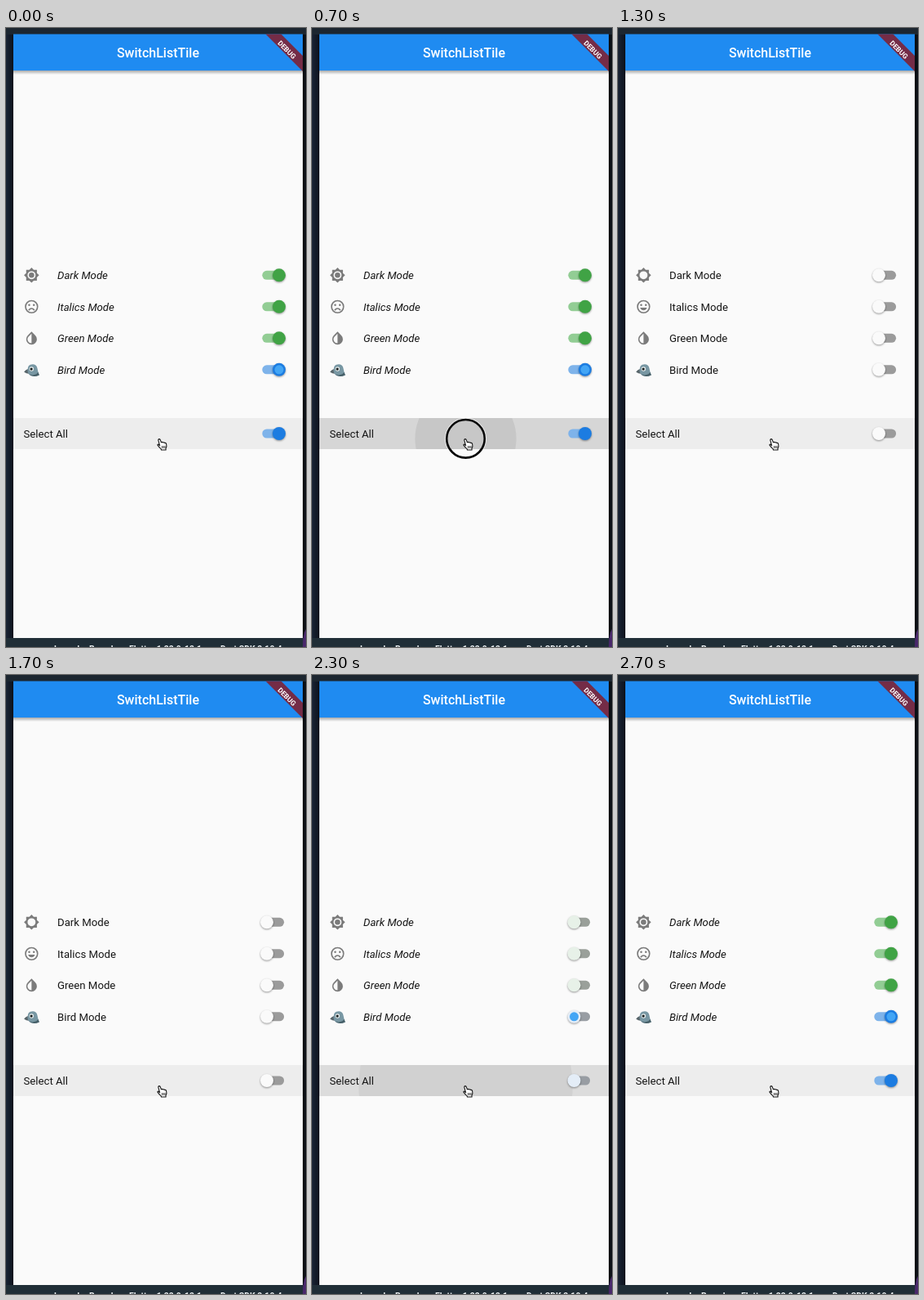
An HTML page for the animation above (2.8 s loop, 368 by 757 pixels).

```html
<!DOCTYPE html>
<html lang="en">
<head>
<meta charset="utf-8">
<title>SwitchListTile</title>
<style>
  html, body { margin: 0; width: 100%; height: 100%; overflow: hidden; background: #151d2a; }
  svg { display: block; width: 368px; height: 757px; font: 13.2px Roboto, sans-serif; fill: #161616; }
  .title { font-size: 16px; font-weight: 500; fill: #fff; text-anchor: middle; }
  .debug { font-size: 8.6px; font-weight: 700; fill: #fff; text-anchor: middle; }
  .status { font-size: 10.5px; font-weight: 700; fill: #e9eef0; }
  .icon { fill: #7b7b7b; }
  .line { fill: none; stroke: #7b7b7b; stroke-width: 2; }
  .thumb { filter: drop-shadow(0 1px 1px #0006); }
</style>
</head>
<body>
<svg viewBox="0 0 368 757">
  <defs>
    <linearGradient id="drop" x2="0" y2="1">
      <stop stop-color="#000" stop-opacity=".32"/>
      <stop offset="1" stop-color="#000" stop-opacity="0"/>
    </linearGradient>
    <linearGradient id="side">
      <stop stop-color="#1a2435"/>
      <stop offset="1" stop-color="#0c121c"/>
    </linearGradient>
    <clipPath id="tile"><path d="M9 477h355v38H9z"/></clipPath>
    <clipPath id="app"><path d="M9 7.5h355V746H9z"/></clipPath>
  </defs>

  <path fill="#1c2630" d="M0 0h368v8H0z"/>
  <path fill="url(#side)" d="M0 8h9v738H0z"/>
  <path fill="#0b0f15" d="M364 8h4v738h-4z"/>
  <path fill="#fafafa" d="M9 8h355v738H9z"/>
  <path fill="url(#drop)" d="M9 52h355v5H9z"/>
  <path fill="#1f8bf1" d="M9 7.5h355V52H9z"/>
  <text class="title" x="186.5" y="36">SwitchListTile</text>
  <path fill="#742c47" d="M318 7l46 46V34L337 7z" clip-path="url(#app)"/>
  <text class="debug" transform="translate(344.5 26.5) rotate(45)" y="3">DEBUG</text>

  <path fill="#202e37" d="M0 746h368v11H0z"/>
  <path fill="#49286b" d="M368 735q-4 6-4 22h4z"/>
  <g class="status">
    <text x="59" y="763">Launch</text><text x="102" y="763">Based on</text>
    <text x="151" y="763">Flutter 1.22.0-12.1</text><text x="263" y="763">Dart SDK 2.10.4</text>
  </g>

  <g clip-path="url(#tile)">
    <path fill="#ededed" d="M9 477h355v38H9z"/>
    <path id="highlight" d="M9 477h355v38H9z" fill="#000"/>
    <circle id="splash" cx="188.5" cy="502" fill="#000"/>
  </g>
  <g id="rows"></g>

  <g id="ring" fill="none">
    <circle cx="188.5" cy="502.3" r="24.6" stroke="#fff" stroke-width="2" opacity=".6"/>
    <circle cx="188.5" cy="502.3" r="23.3" stroke="#080808" stroke-width="2.6"/>
  </g>
  <path fill="#fff" stroke="#111" stroke-width="1.1" stroke-linejoin="round"
    d="M188.6 510.6l-1.7-6.2q-.2-1.7 1.1-1.8 1 0 1.4 1.3l.9 2.8q1.6-.9 2.3.3 1.5-.6 2.1.5 1.5-.4 1.9 1l.3 2.8q0 1.6-.9 2.6l.1 2.1h-5.6l-.4-1.4q-2.4-1.6-4-4.3-.4-1.2.8-1.2z"/>
  <path stroke="#111" stroke-width=".8" d="M191.6 511v3M193.3 511v3M195 511v3"/>
</svg>

<script>
const LOOP = 2800, STEP = 100;
const taps = [{ down: 355, up: 738 }, { down: 1750, up: 2248 }];
const BLUE = { thumb: [28, 124, 225], track: [126, 179, 234] };
const GREEN = { thumb: [64, 163, 69], track: [146, 205, 148] };
const OFF = { thumb: [250, 250, 250], track: [155, 155, 155] };

const sun = 'M20 8.69V4h-4.69L12 .69 8.69 4H4v4.69L.69 12 4 15.31V20h4.69L12 23.31 15.31 20H20v-4.69L23.31 12zM12 18a6 6 0 1 1 0-12 6 6 0 0 1 0 12z';
const face = '<circle class="line" cx="12" cy="12" r="9"/><circle cx="8.5" cy="9.5" r="1.5"/><circle cx="15.5" cy="9.5" r="1.5"/>';
const icons = [
  `<path fill-rule="evenodd" d="${sun}"/><circle class="on" cx="12" cy="12" r="4"/>`,
  `${face}<path class="on line" d="M7.7 17.2q4.3-5 8.6 0"/><path class="off" d="M6.9 13.5h10.2q-1.5 4-5.1 4t-5.1-4z"/>`,
  '<path d="M17.66 7.93L12 2.27 6.34 7.93a8 8 0 1 0 11.32 0zM12 19.59A6 6 0 0 1 7.76 9.35L12 5.1z"/>',
  `<path fill="#58656a" d="M8 11Q4 11 .8 15.6q5 3.2 9 2z"/>
   <path fill="#7897a3" d="M6 13Q6 4 13.5 4q6 0 7.2 6 .7 5 2.8 10-6 3-12 1-5.5-2-5.5-8z"/>
   <path fill="#476069" d="M8 19q9 3 14-3l1.5 4q-9 4.500-15.500-1z"/>
   <circle cx="12" cy="11" r="3.300" fill="#e9eeee"/><circle cx="11.700" cy="11" r="2" fill="#1c2222"/>`
];
const labels = ['Dark Mode', 'Italics Mode', 'Green Mode', 'Bird Mode', 'Select All'];

const $ = id => document.getElementById(id);
$('rows').innerHTML = labels.map((label, i) => {
  const y = i < 4 ? 302.3 + i * 38.5 : 496;
  const icon = icons[i] ? `<g class="icon" transform="translate(21.5 ${-9.8}) scale(.82)">${icons[i]}</g>` : '';
  const badge = i === 3 ? '<circle class="on" r="5.5" fill="#42a5f5"/>' : '';
  return `<g transform="translate(0 ${y})">${icon}
    <text x="${i < 4 ? 63 : 21.5}" y="5">${label}</text>
    <rect class="track" x="314.3" y="-5.5" width="26.800" height="11" rx="5.5"/>
    <g class="knob"><circle class="thumb" r="8"/>${badge}</g></g>`;
}).join('');
const rows = [...$('rows').children];

const clamp = v => Math.max(0, Math.min(1, v));
const mix = (a, b, p) => `rgb(${a.map((v, i) => v + (b[i] - v) * p)})`;

function drawSwitches(t) {
  const [first, second] = taps;
  const on = t < first.up || t >= second.up;
  const turningOn = clamp((t - second.up) / 200) ** 1.7;
  const turningOff = 1 - clamp((t - first.up) / 200);
  const pos = t < second.up ? 1 - (1 - turningOff) ** 1.7 : turningOn;

  rows.forEach((row, i) => {
    const active = on && i < 3 ? GREEN : BLUE;
    row.querySelector('.track').style.fill = mix(OFF.track, active.track, pos);
    row.querySelector('.thumb').style.fill = mix(OFF.thumb, active.thumb, pos);
    row.querySelector('.knob').setAttribute('transform', `translate(${320 + 15 * pos} 0)`);
    row.querySelector('text').style.fontStyle = on && i < 4 ? 'italic' : 'normal';
    row.querySelectorAll('.on').forEach(e => e.style.display = on ? '' : 'none');
    row.querySelectorAll('.off').forEach(e => e.style.display = on ? 'none' : '');
  });
}

function drawPress(t) {
  const tap = t < taps[1].down ? taps[0] : taps[1];
  const held = Math.max(0, Math.min(t, tap.up) - tap.down);
  const released = Math.max(0, t - tap.up);
  const fade = 1 - clamp(released / 200);
  $('highlight').setAttribute('opacity', 0.097 * clamp(held / 200) * fade);
  $('splash').setAttribute('opacity', 0.07 * fade);
  $('splash').setAttribute('r', Math.min(183, held * 0.18 + released * 0.8));
  $('ring').style.display = held > 0 && released === 0 ? '' : 'none';
}

function frame(now) {
  const t = Math.floor(now % LOOP / STEP) * STEP;
  drawSwitches(t);
  drawPress(t);
  requestAnimationFrame(frame);
}
frame(performance.now());
</script>
</body>
</html>
```
